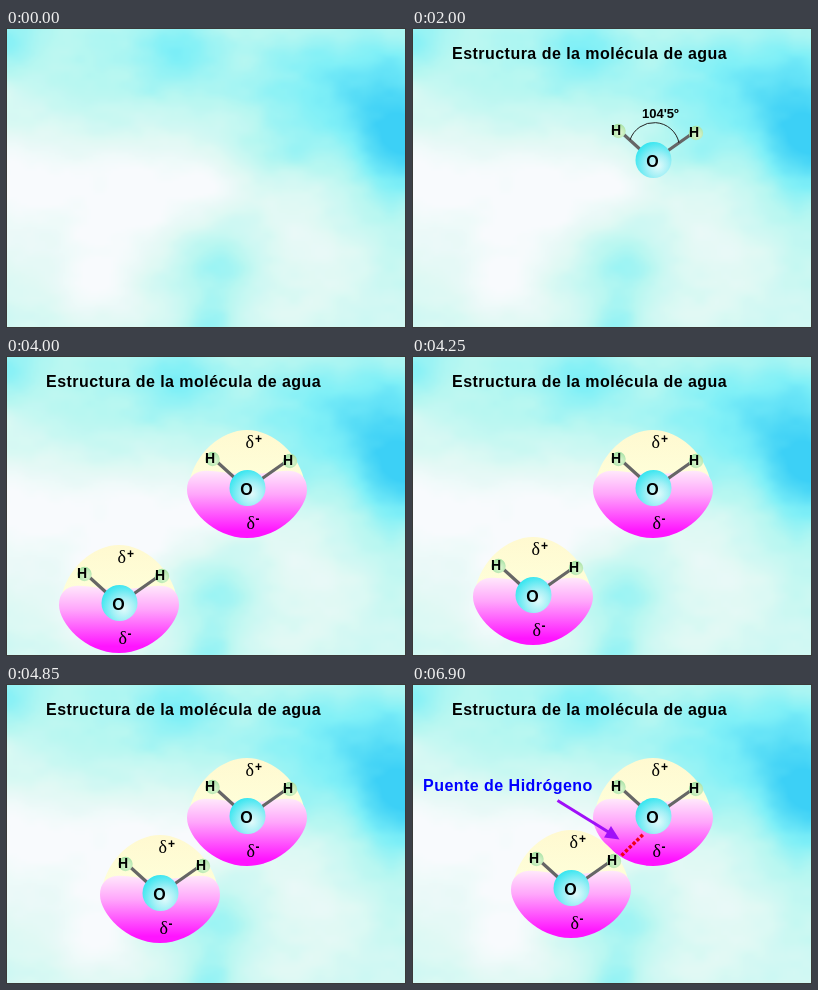
These frames come from a looping animation (400 by 300 pixels, 8.4 s). An HTML page with a canvas:

```html
<!DOCTYPE html>
<html lang="es">
<head>
<meta charset="utf-8">
<title>Estructura de la molécula de agua</title>
<style>
  html, body { margin: 0; width: 100%; height: 100%; overflow: hidden; }
  canvas, svg { position: absolute; left: 0; top: 0; width: 100%; height: 100%; }
  text { font-family: "Liberation Sans", Arial, sans-serif; font-weight: bold; }
  .title { font-size: 16px; letter-spacing: .47px; }
  .angle { font-size: 13px; }
  .atom { font-size: 14px; text-anchor: middle; }
  .oxygen { font-size: 16px; }
  .delta { font: 18px "Liberation Serif", "Times New Roman", serif; }
  .sign { font-size: 12px; }
</style>
</head>
<body>
<canvas id="sky" width="200" height="150"></canvas>
<svg viewBox="0 0 400 300">
  <defs>
    <linearGradient id="cream" x2="0" y2="1">
      <stop stop-color="#fff9d0"/>
      <stop offset="1" stop-color="#feffda"/>
    </linearGradient>
    <linearGradient id="pink" x2="0" y2="1">
      <stop stop-color="#ffe8fb"/>
      <stop offset=".35" stop-color="#ffa6fb"/>
      <stop offset=".9" stop-color="#ff14ff"/>
    </linearGradient>
    <radialGradient id="cyan" cx=".62" cy=".66" r=".68">
      <stop stop-color="#e2fbfb"/>
      <stop offset=".45" stop-color="#a4f0f6"/>
      <stop offset="1" stop-color="#3ae6f0"/>
    </radialGradient>
    <radialGradient id="green" cx=".6" cy=".62" r=".65">
      <stop stop-color="#e2f8d4"/>
      <stop offset="1" stop-color="#a2dfa0"/>
    </radialGradient>

    <g id="lobes">
      <path fill="url(#cream)" d="M183 128C188 98 215 74 241 74S294 98 299 128Z"/>
      <path fill="url(#pink)" d="M181 134C181 122 188 116 197 115C210 114 218 118 241 118S272 114 285 115C295 116 301 122 301 134C301 152 275 182 241 182S181 152 181 134Z"/>
    </g>
    <g id="atoms">
      <path stroke="#666" stroke-width="3.2" d="M209 104L231 124M281 105L254 124"/>
      <circle cx="206.5" cy="103" r="7.2" fill="url(#green)"/>
      <circle cx="284" cy="105" r="7.2" fill="url(#green)"/>
      <circle cx="241.5" cy="132" r="18" fill="url(#cyan)"/>
      <text class="atom" x="204" y="107">H</text>
      <text class="atom" x="282" y="109">H</text>
      <text class="atom oxygen" x="240.5" y="139">O</text>
    </g>
    <g id="charges">
      <text class="delta" x="239.5" y="92">δ</text>
      <text class="sign" x="249" y="87">+</text>
      <text class="delta" x="240.5" y="173">δ</text>
      <text class="sign" x="249.5" y="167">-</text>
    </g>
  </defs>

  <rect x=".5" y=".5" width="399" height="299" fill="none" stroke="#3a3a3a"/>
  <text class="title" x="40" y="31" data-on="500">Estructura de la molécula de agua</text>
  <use href="#lobes" data-on="3500"/>
  <use href="#atoms" data-on="500"/>
  <use href="#charges" data-on="3750"/>
  <g data-on="2000" data-off="3500">
    <path d="M218 112A25.4 25.4 0 0 1 267 115" fill="none" stroke="#222"/>
    <text class="angle" x="230" y="89.5">104'5º</text>
  </g>

  <g id="guest" data-on="4000">
    <use href="#lobes"/>
    <use href="#atoms"/>
    <use href="#charges"/>
  </g>
  <path data-on="5150" d="M209.5 171.5L231 150.5" stroke="#f00018" stroke-width="3.5" stroke-dasharray="3.3 2"/>
  <text class="title" x="11" y="107" fill="#00f" data-on="6650">Puente de Hidrógeno</text>
  <g data-on="6900" fill="#a010f8">
    <path d="M145.5 116.5L198 149" stroke="#a010f8" stroke-width="3"/>
    <path d="M207.5 155.5L192 153.5L199 142Z"/>
  </g>
</svg>
<script>
const LOOP = 8400;
const mix = (a, b, k) => a + (b - a) * k;
const clamp = (v, lo, hi) => Math.min(hi, Math.max(lo, v));

// Repeatable value noise, 0 to 1
function hash(x, y) {
  const n = Math.sin(x * 127.1 + y * 311.7) * 43758.5;
  return n - Math.floor(n);
}
function noise(x, y) {
  const i = Math.floor(x), j = Math.floor(y);
  const ease = k => k * k * (3 - 2 * k);
  const u = ease(x - i), v = ease(y - j);
  return mix(mix(hash(i, j), hash(i + 1, j), u),
             mix(hash(i, j + 1), hash(i + 1, j + 1), u), v);
}

// Soft patches of sky (+) and cloud (-): x, y, radius, strength
const patches = [
  [0, 0, 35, .35], [60, 50, 70, .13], [170, 25, 45, .3], [300, 70, 75, .3],
  [390, 40, 60, .25], [395, 115, 55, .55], [20, 160, 70, -.4], [130, 165, 55, -.4],
  [200, 155, 35, -.25], [90, 250, 50, -.35], [290, 220, 70, -.2], [215, 240, 35, .25],
  [205, 295, 25, .25]
];
const ramp = [[248, 250, 253], [224, 249, 244], [184, 247, 241], [128, 240, 247], [60, 208, 246]];

function blueness(x, y) {
  let v = .38;
  for (const [px, py, r, amount] of patches)
    v += amount * Math.exp(-((x - px) ** 2 + (y - py) ** 2) / r ** 2);
  for (let size = 48, amp = .14; size > 10; size /= 2, amp /= 2)
    v += amp * (noise(x / size, y / size * 1.5) - .5);
  return clamp(v, 0, .999);
}

function paintSky({ width, height }, ctx) {
  const image = ctx.createImageData(width, height);
  for (let p = 0; p < width * height; p++) {
    const v = blueness(p % width * 2 + 1, Math.floor(p / width) * 2 + 1) * (ramp.length - 1);
    const i = Math.floor(v);
    ramp[i].forEach((c, n) => image.data[p * 4 + n] = mix(c, ramp[i + 1][n], v - i));
    image.data[p * 4 + 3] = 255;
  }
  ctx.putImageData(image, 0, 0);
}

const sky = document.getElementById("sky");
const guest = document.getElementById("guest");
const timed = document.querySelectorAll("[data-on]");

function draw(now) {
  const t = now % LOOP;
  for (const el of timed) {
    const { on, off = LOOP } = el.dataset;
    el.style.display = t >= on && t < off ? "" : "none";
  }
  // The second molecule approaches in jumps, 150 ms apart
  const step = Math.max(0, Math.floor((t - 4100) / 150));
  const dx = Math.min(-82, Math.round(-128 + 8.25 * step));
  const dy = Math.max(72, Math.round(115 - 7.7 * step));
  guest.setAttribute("transform", `translate(${dx} ${dy})`);
  requestAnimationFrame(draw);
}
paintSky(sky, sky.getContext("2d"));
draw(0);
</script>
</body>
</html>
```
